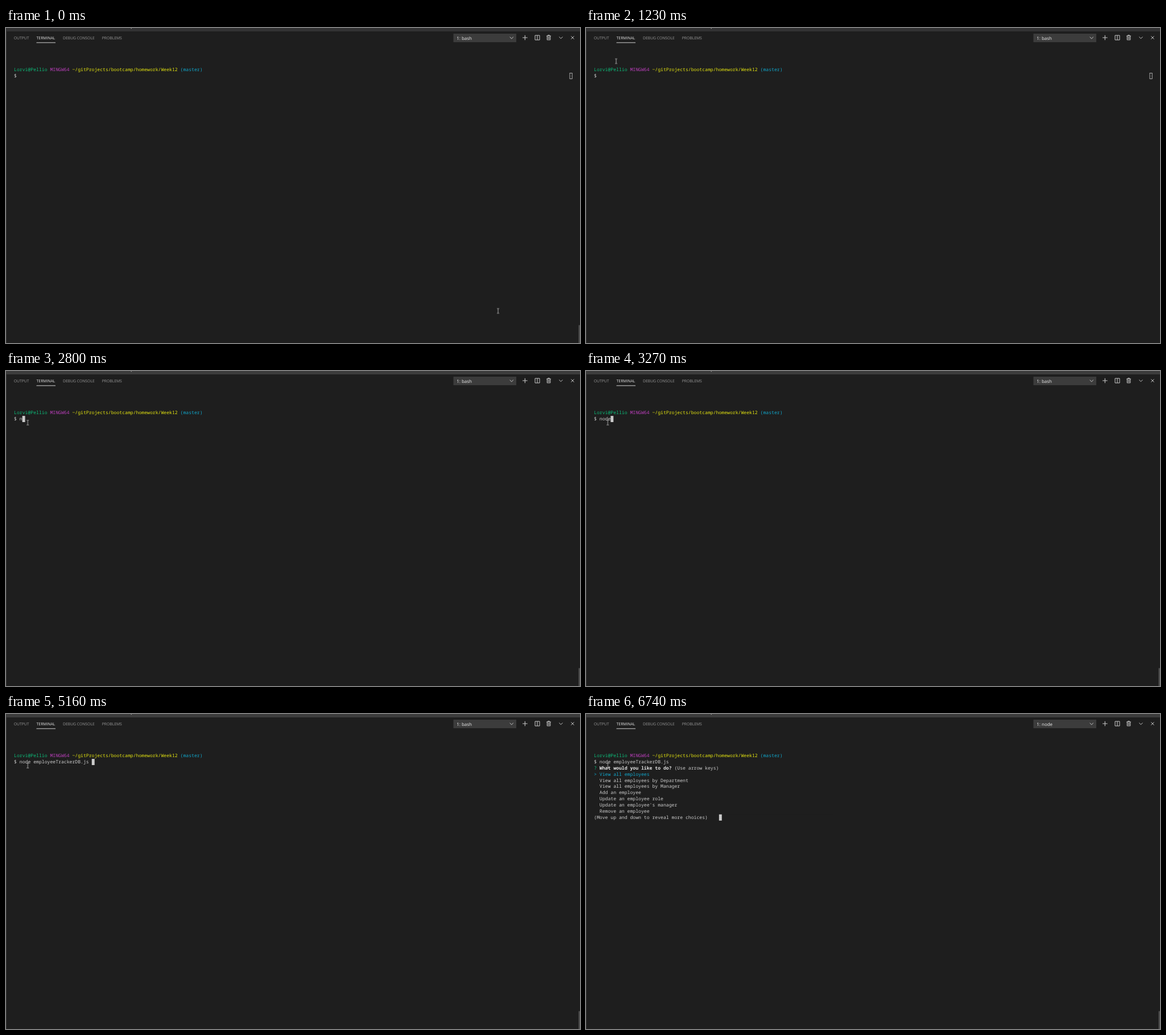
These frames come from a looping animation (1009 by 555 pixels, 8000 ms). An HTML page:

```html
<!DOCTYPE html>
<html lang="en">
<head>
<meta charset="utf-8">
<title>Terminal session</title>
<style>
  :root { --ch: 4.885px; --bg: #1e1e1e; }
  html, body { margin: 0; width: 100%; height: 100%; overflow: hidden; background: var(--bg); }
  svg { display: block; width: 1009px; height: 555px; }
  text { white-space: pre; text-rendering: geometricPrecision; }

  .ui { font: 6.8px "Open Sans", "Noto Sans", sans-serif; fill: #979797; }
  .ui .on { fill: #e7e7e7; }
  .select { font: 7.95px "Open Sans", "Noto Sans", sans-serif; fill: #f0f0f0; }
  .icons { fill: none; stroke: #c8c8c8; stroke-width: 1; }
  .term { font: 8.142px "Noto Sans Mono", "DejaVu Sans Mono", monospace; fill: #cccccc; }
  .green { fill: #0dbc79; }
  .magenta { fill: #bc3fbc; }
  .yellow { fill: #e5e510; }
  .cyan { fill: #11a8cd; }
  .bold { font-weight: 700; fill: #e5e5e5; }

  /* Every change is a hard cut on one shared 8 s clock. */
  .anim { animation: 8s step-end infinite; }
  .blur { animation-name: until-focus; }
  .focus { animation-name: from-focus; }
  .idle { animation-name: until-typing; }
  .command { animation-name: from-typing; }
  .bash { animation-name: until-node; }
  .node { animation-name: from-node; }
  .menu { animation-name: from-menu; }
  .thumb { animation-name: thumb; }
  .caret { animation-name: caret; }
  .mouse { animation-name: mouse; }

  @keyframes until-focus { 0% { opacity: 1 } 24.25%, 100% { opacity: 0 } }
  @keyframes from-focus { 0% { opacity: 0 } 24.25%, 100% { opacity: 1 } }
  @keyframes until-typing { 0% { opacity: 1 } 35%, 100% { opacity: 0 } }
  @keyframes from-typing { 0% { opacity: 0 } 35%, 100% { opacity: 1 } }
  @keyframes until-node { 0% { opacity: 1 } 79.375%, 100% { opacity: 0 } }
  @keyframes from-node { 0% { opacity: 0 } 79.375%, 100% { opacity: 1 } }
  @keyframes from-menu { 0% { opacity: 0 } 84.25%, 100% { opacity: 1 } }
  @keyframes thumb { 0% { opacity: 1 } 7.875% { opacity: 0 } 16.25%, 100% { opacity: 1 } }

  @keyframes caret {
    0% { transform: translate(calc(3 * var(--ch)), 0) }
    36.875% { transform: translate(calc(4 * var(--ch)), 0) }
    38% { transform: translate(calc(5 * var(--ch)), 0) }
    40.875% { transform: translate(calc(6 * var(--ch)), 0) }
    49.625% { transform: translate(calc(7 * var(--ch)), 0) }
    56.625% { transform: translate(calc(8 * var(--ch)), 0) }
    58.5% { transform: translate(calc(9 * var(--ch)), 0) }
    64.5% { transform: translate(calc(28 * var(--ch)), 0) }
    84.25%, 100% { transform: translate(calc(45 * var(--ch)), 97.8px) }
  }

  @keyframes mouse {
    0% { transform: translate(865px, 498.5px) }
    .875% { transform: translate(440px, 300px) }
    1.875% { transform: translate(91px, 144.5px) }
    2.875% { transform: translate(-30px, -30px) }
    12.875% { transform: translate(70px, 22px) }
    13.75% { transform: translate(62px, 35px) }
    14.5% { transform: translate(57px, 48px) }
    15.375% { transform: translate(53px, 58.5px) }
    16.25% { transform: translate(45px, 75px) }
    17.25% { transform: translate(39px, 86px) }
    22.25% { transform: translate(34px, 93px) }
    23.25% { transform: translate(33px, 94px) }
    24.25% { transform: translate(36px, 92px) }
    25.25%, 100% { transform: translate(38.2px, 91px) }
  }
</style>
</head>
<body>
<svg viewBox="0 0 1009 555">
  <rect width="1009" height="555" fill="#1e1e1e"/>
  <rect width="1" height="555" fill="#383838"/>
  <rect class="anim blur" width="1009" height="6" fill="#323233"/>
  <rect class="anim focus" width="1009" height="6" fill="#3c3c3c"/>
  <rect x="219.6" width="1.4" height="1.2" fill="#a0a0a0"/>

  <g class="ui">
    <text x="13.7" y="20">OUTPUT</text>
    <text x="53.6" y="20" class="on">TERMINAL</text>
    <text x="100" y="20">DEBUG CONSOLE</text>
    <text x="168.7" y="20">PROBLEMS</text>
    <rect x="53.5" y="25.4" width="33.5" height=".9" class="on"/>
  </g>

  <rect x="786.5" y="10" width="110.5" height="15" fill="#3c3c3c"/>
  <g class="select">
    <text x="792.3" y="21" class="anim bash">1: bash</text>
    <text x="792.3" y="21" class="anim node">1: node</text>
  </g>

  <g class="icons">
    <path d="M885.6 15.8l3.1 3 3.1-3"/>
    <path d="M908 17h8.6M912.3 12.7v8.6" stroke-width="1.1"/>
    <path d="M930 13h8v8h-8zM934 13v8"/>
    <path d="M950 14h8M952.6 14v-1.4h2.8v1.4M951.2 14v6.9h5.6v-6.9M953.1 15.5v4M955 15.5v4"/>
    <path d="M972.3 15.6l3.1 3 3.1-3"/>
    <path d="M993.3 14.4l5.2 5.2M998.5 14.4l-5.2 5.2"/>
  </g>

  <g class="term">
    <text x="14" y="76"><tspan class="green">Lorvi@Pellio</tspan> <tspan class="magenta">MINGW64</tspan> <tspan class="yellow">~/gitProjects/bootcamp/homework/Week12</tspan> <tspan class="cyan">(master)</tspan></text>
    <text x="14" y="86.9">$</text>
    <text x="23.8" y="86.9" class="anim command">node employeeTrackerDB.js</text>

    <g class="anim menu">
      <text x="14" y="97.8"><tspan class="green">?</tspan> <tspan class="bold">What would you like to do?</tspan> (Use arrow keys)</text>
      <text x="14" y="108.6" class="cyan">&gt; View all employees</text>
      <text x="23.8" y="119.5">View all employees by Department</text>
      <text x="23.8" y="130.4">View all employees by Manager</text>
      <text x="23.8" y="141.2">Add an employee</text>
      <text x="23.8" y="152.1">Update an employee role</text>
      <text x="23.8" y="163">Update an employee's manager</text>
      <text x="23.8" y="173.8">Remove an employee</text>
      <text x="14" y="184.7">(Move up and down to reveal more choices)</text>
    </g>
  </g>

  <g class="anim idle">
    <rect class="anim blur" x="991" y="79.5" width="4.2" height="10.1" fill="none" stroke="#cccccc" stroke-width=".8"/>
    <rect class="anim focus" x="990.6" y="79.1" width="5" height="10.9" fill="#cccccc"/>
  </g>
  <!-- The caret carries a cover that hides the untyped rest of the command. -->
  <g class="anim command">
    <g class="anim caret">
      <rect x="14" y="79.1" width="200" height="10.9" fill="#1e1e1e"/>
      <rect x="14" y="79.1" width="4.9" height="10.9" fill="#cccccc"/>
    </g>
  </g>

  <rect class="anim thumb" x="1006.5" y="523.5" width="2.5" height="31.5" fill="#4e4e4e"/>
  <path class="anim mouse" d="M-2-4.1h1.4L0-3.6l.6-.5H2M0-3.6v7.2M-2 4.1h1.4L0 3.6l.6.5H2" fill="none" stroke="#d0d0d0" stroke-width=".8"/>
</svg>
</body>
</html>
```
